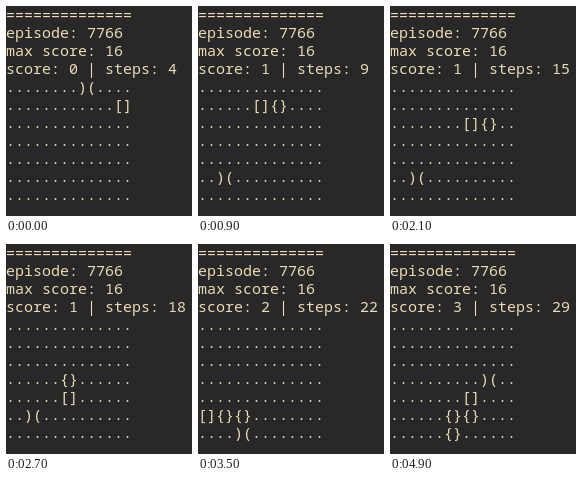
An HTML page with a canvas that plays this animation: 186x210 px, repeating every 5 s.

```html
<!DOCTYPE html>
<html lang="en">
<head>
<meta charset="utf-8">
<title>Terminal snake</title>
<style>
  html, body { margin: 0; width: 100%; height: 100%; overflow: hidden; background: #282828; }
  canvas { display: block; }
</style>
</head>
<body>
<canvas id="screen" width="186" height="210"></canvas>
<script>
const ctx = document.getElementById('screen').getContext('2d');
const LOOP = 5000, SIZE = 7, FIRST_STEP = 4;
const CHAR_WIDTH = 9, LINE_HEIGHT = 18, BASELINE = 14;
const MOVES = { U: [0, -1], D: [0, 1], L: [-1, 0], R: [1, 0] };

// Head position at every step, walked from the starting cell.
const path = [[6, 1]];
for (const move of 'LULDLDDRRULDLDLDLLDRRRURU') {
  const [x, y] = path[path.length - 1];
  const [dx, dy] = MOVES[move];
  path.push([x + dx, y + dy]);
}

// Each food with the step at which it is eaten.
const foods = [
  { cell: [4, 0], eaten: 7 },
  { cell: [1, 5], eaten: 21 },
  { cell: [2, 6], eaten: 25 },
  { cell: [5, 3], eaten: Infinity }
];

function stepAt(time) {
  const late = time >= 3700 && time < 3800; // one step comes 100 ms late
  return FIRST_STEP + Math.floor((time + 100) / 200) - (late ? 1 : 0);
}

function screenLines(step) {
  const score = foods.filter(food => food.eaten <= step).length;
  const grid = Array.from({ length: SIZE }, () => Array(SIZE).fill('..'));
  const put = ([x, y], mark) => { grid[y][x] = mark; };

  put(foods[score].cell, ')(');
  const head = step - FIRST_STEP;
  for (let i = score; i > 0; i--) put(path[head - i], '{}');
  put(path[head], '[]');

  return [
    '='.repeat(2 * SIZE),
    'episode: 7766',
    'max score: 16',
    `score: ${score} | steps: ${step}`,
    ...grid.map(row => row.join(''))
  ];
}

function draw(step) {
  ctx.fillStyle = '#282828';
  ctx.fillRect(0, 0, 186, 210);
  ctx.fillStyle = '#ebdbb2';
  ctx.font = '15px "Noto Sans Mono", monospace';
  screenLines(step).forEach((line, row) => {
    [...line].forEach((char, col) =>
      ctx.fillText(char, col * CHAR_WIDTH, BASELINE + row * LINE_HEIGHT));
  });
}

function frame() {
  draw(stepAt(performance.now() % LOOP));
  requestAnimationFrame(frame);
}
frame();
</script>
</body>
</html>
```
